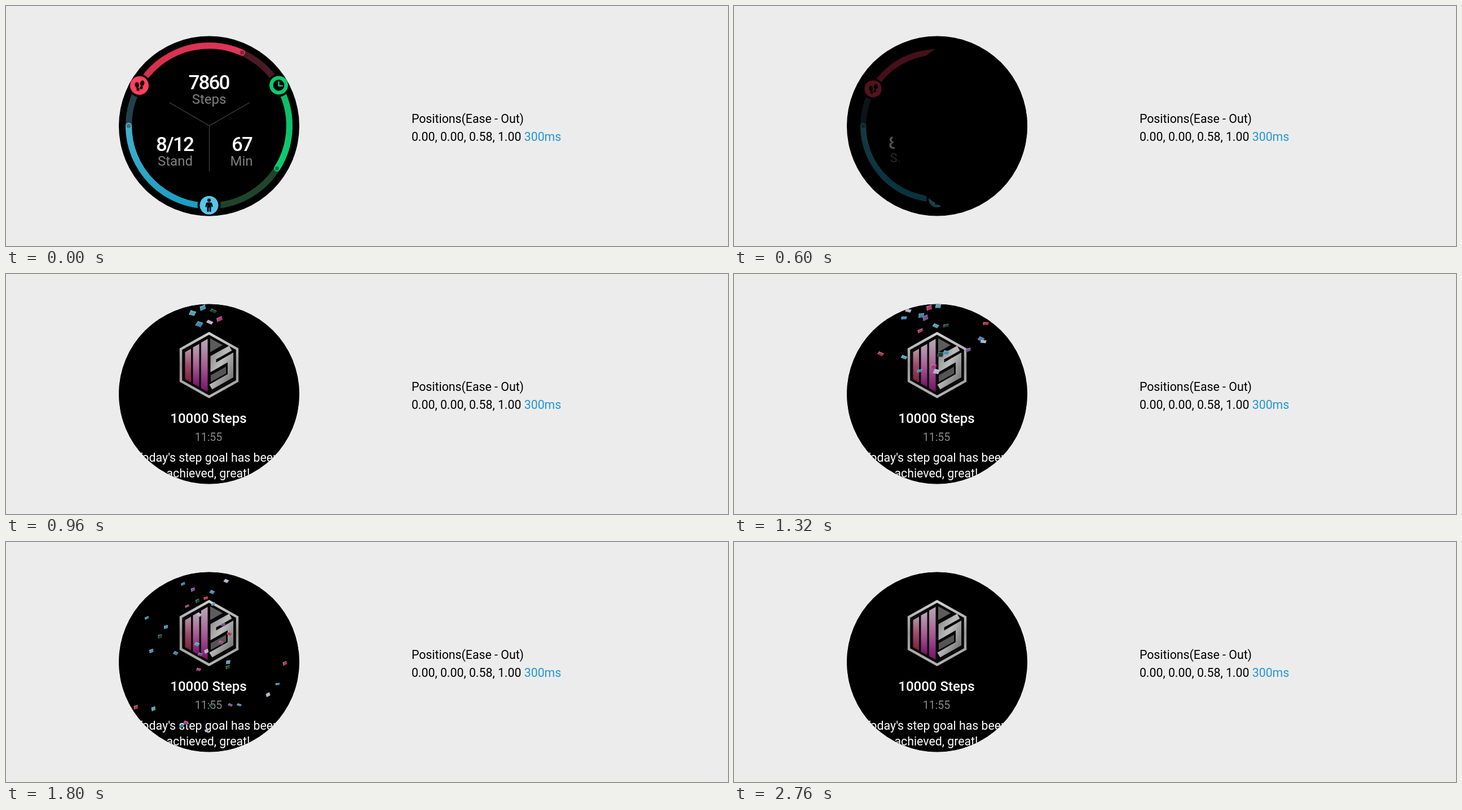
Recreate the animation shown at these times as an HTML page with a canvas. Size 1280 by 427 pixels, loop 4 s.

```html
<!DOCTYPE html>
<html lang="en">
<head>
<meta charset="utf-8">
<title>Step goal transition</title>
<style>
  html, body { margin: 0; width: 100%; height: 100%; overflow: hidden; background: #ececec; }
  svg, canvas { position: absolute; left: 0; top: 0; width: 1280px; height: 427px; }
  text { font-family: Roboto, sans-serif; }
  .mid { text-anchor: middle; fill: #fff; }
  .num { font-size: 35px; font-weight: 500; letter-spacing: -1.9px; }
  .label { font-size: 24px; fill: #808080; }
  .time { font-size: 19.5px; fill: #8a8a8a; }
  .body { font-size: 21.3px; }
  .arc { fill: none; stroke-width: 11; }

  #rings, #page, #content { animation: 4s linear infinite; }
  #rings { animation-name: recede; transform-origin: 360px 213.5px; }
  #page { animation-name: enter; }
  #content { animation-name: appear; }
  @keyframes recede {
    0%, 10.8% { transform: none; opacity: 1; animation-timing-function: cubic-bezier(0, 0, .58, 1); }
    18.3%, 100% { transform: scale(.892); opacity: .1; }
  }
  @keyframes enter {
    0%, 10.8% { transform: translateX(320px); animation-timing-function: cubic-bezier(0, 0, .58, 1); }
    18.3%, 100% { transform: none; }
  }
  @keyframes appear {
    0%, 16.5% { opacity: 0; }
    22%, 100% { opacity: 1; }
  }
</style>
</head>
<body>
<svg viewBox="0 0 1280 427">
  <defs>
    <clipPath id="face"><circle cx="360" cy="213.5" r="160"/></clipPath>
    <linearGradient id="red"><stop stop-color="#d6304c"/><stop offset="1" stop-color="#e0365a"/></linearGradient>
    <linearGradient id="green" x2="0" y2="1"><stop stop-color="#0fba68"/><stop offset="1" stop-color="#0ccb72"/></linearGradient>
    <linearGradient id="blue" x2="0" y2="1"><stop stop-color="#45b1cd"/><stop offset="1" stop-color="#1a9dc2"/></linearGradient>
    <linearGradient id="silver" x2="1" y2="1"><stop stop-color="#858585"/><stop offset=".45" stop-color="#bcbcbc"/><stop offset="1" stop-color="#6e6e6e"/></linearGradient>
    <linearGradient id="frame" x2="0" y2="1"><stop stop-color="#cfcfcf"/><stop offset=".5" stop-color="#969696"/><stop offset="1" stop-color="#b4b4b4"/></linearGradient>
    <linearGradient id="ruby" x2="0" y2="1"><stop stop-color="#b397a3"/><stop offset=".5" stop-color="#9c4a6c"/><stop offset="1" stop-color="#7d1f38"/></linearGradient>
    <linearGradient id="violet" x2="0" y2="1"><stop stop-color="#b9a8b5"/><stop offset=".5" stop-color="#a65f95"/><stop offset="1" stop-color="#761068"/></linearGradient>
  </defs>

  <circle cx="360" cy="213.5" r="160"/>
  <g clip-path="url(#face)">
    <g id="rings">
      <path class="arc" stroke="#491b24" d="M236.6 141.8A142.5 142.5 0 0 1 483.4 141.8"/>
      <path class="arc" stroke="#1f452c" d="M483.4 141.8A142.5 142.5 0 0 1 360 355.5"/>
      <path class="arc" stroke="#22414a" d="M360 355.5A142.5 142.5 0 0 1 236.6 141.8"/>
      <g stroke-linecap="round">
        <path class="arc" stroke="url(#red)" d="M236.6 141.8A142.5 142.5 0 0 1 418.5 83"/>
        <path class="arc" stroke="url(#green)" d="M483.4 141.8A142.5 142.5 0 0 1 480.5 289"/>
        <path class="arc" stroke="url(#blue)" d="M360 355.5A142.5 142.5 0 0 1 217.5 213"/>
      </g>
      <circle cx="418.5" cy="83" r="3.7" fill="#8b2237"/>
      <circle cx="480.5" cy="289" r="3.7" fill="#147343"/>
      <circle cx="217.5" cy="213.5" r="3.7" fill="#3c6f7d"/>

      <g transform="translate(236.5 141.5)">
        <circle r="20.5"/><circle r="16.5" fill="#ff405c"/>
        <g id="foot" transform="translate(-4 1) rotate(-8)">
          <ellipse cy="-2" rx="3.7" ry="5"/><ellipse cx=".6" cy="6" rx="2.7" ry="3"/>
        </g>
        <use href="#foot" transform="translate(.8 -3) scale(-1 1)"/>
      </g>
      <g transform="translate(483.5 141)">
        <circle r="20.5"/><circle r="16.5" fill="#0cca70"/><circle r="10"/>
        <path d="M0-7V1H7" fill="none" stroke="#0cca70" stroke-width="2.4"/>
      </g>
      <g transform="translate(360 354.5)">
        <circle r="20.5"/><circle r="16.5" fill="#55c6ea"/>
        <circle cy="-9" r="3"/>
        <path d="M-4-5H4Q6-4.5 6.5 3L4.7 3.5 3.5-1V11.5H.6V4H-.6V11.5H-3.5V-1L-4.7 3.5-6.5 3Q-6-4.5-4-5Z"/>
      </g>

      <path d="M290 172L360.5 213 431.5 172M360.5 213V294.5" fill="none" stroke="#434343" stroke-width="1.2"/>
      <text class="mid num" x="359.5" y="147.5">7860</text>
      <text class="mid label" x="360" y="174">Steps</text>
      <text class="mid num" x="299" y="258">8/12</text>
      <text class="mid label" x="300" y="284">Stand</text>
      <text class="mid num" x="418" y="258">67</text>
      <text class="mid label" x="417.5" y="284">Min</text>
    </g>

    <g id="page">
      <circle cx="360" cy="213.5" r="160"/>
      <g id="content">
        <path d="M360 105.5L410 133.5V190.5L360 218.5 310 190.5V133.5Z" fill="#080808" stroke="url(#frame)" stroke-width="4.4"/>
        <path d="M317.5 139L328 133V193L317.5 187Z" fill="url(#ruby)"/>
        <path d="M331.5 130.5L342.5 124.5V201L331.5 195Z" fill="url(#violet)"/>
        <path d="M346 122L357.5 115.5V209.5L346 203Z" fill="url(#violet)"/>
        <path d="M362 114.5L384 126.5 362 139Z" fill="#5c5c5c"/>
        <path d="M363 180L390 165V177L363 192Z" fill="#555"/>
        <path d="M398 132L367.5 149V166L398 148.5V181L363 201" fill="none" stroke="url(#silver)" stroke-width="10"/>
        <text class="mid" x="359" y="265" font-size="24" font-weight="500">10000 Steps</text>
        <text class="mid time" x="359" y="297">11:55</text>
        <text class="mid body" x="357.3" y="334">Today's step goal has been</text>
        <text class="mid body" x="358.5" y="362">achieved, great!</text>
      </g>
    </g>
  </g>

  <text class="body" x="718.9" y="208">Positions(Ease - Out)</text>
  <text class="body" x="718.9" y="240">0.00, 0.00, 0.58, 1.00 <tspan fill="#2196d8">300ms</tspan></text>
</svg>
<canvas id="confetti" width="1280" height="427"></canvas>

<script>
const ctx = document.getElementById('confetti').getContext('2d');
const clock = document.getElementById('page').getAnimations()[0];
const COLORS = ['#3f83a8', '#b9b2c8', '#b03672', '#5b9fb4', '#1c3f33', '#b8304c', '#4c8fb8', '#75528f'];
const COUNT = 34, START = 700, STOP = 2760;

let seed = 11;
function random(min, max) {
  seed = (seed * 16807) % 2147483647;
  return min + (max - min) * seed / 2147483647;
}

// Pieces are released one after another above the face and drift apart.
const pieces = Array.from({ length: COUNT }, (_, i) => ({
  birth: START + 28 * i + random(0, 30),
  x: 360 + random(-75, 75),
  drift: random(-0.1, 0.1),
  speed: random(0.15, 0.2),
  phase: random(0, 2 * Math.PI),
  color: COLORS[i % COLORS.length]
}));

// Pieces recede: slowly at first, then down to dots.
function sizeAt(t) {
  const k = Math.min(1, (t - START) / 1390);
  return 1.8 + 8.5 * Math.sqrt(1 - k * k);
}

function drawPiece({ birth, x, drift, speed, phase, color }, t, size) {
  const age = t - birth;
  if (age < 0) return;
  const height = size * (0.7 + 0.18 * Math.sin(t / 110 + phase));
  ctx.save();
  ctx.translate(x + drift * age, 45 + speed * age + 0.0001 * age * age);
  ctx.rotate(0.45 * Math.sin(t / 240 + phase * 2));
  ctx.transform(1, 0, -0.2, 1, 0, 0);
  ctx.fillStyle = color;
  ctx.fillRect(-size / 2, -height / 2, size, height);
  if (size > 4) {
    ctx.fillStyle = 'rgba(190, 225, 240, .4)';
    ctx.fillRect(-size / 2, -height / 2, size, 1.2);
    ctx.fillRect(-size / 2, -height / 2, 1.2, height);
  }
  ctx.restore();
}

function draw() {
  requestAnimationFrame(draw);
  const t = (clock.currentTime || 0) % 4000;
  ctx.clearRect(0, 0, 1280, 427);
  if (t < START || t >= STOP) return;
  const size = sizeAt(t);
  ctx.save();
  ctx.beginPath();
  ctx.arc(360, 213.5, 160, 0, 2 * Math.PI);
  ctx.clip();
  pieces.forEach(piece => drawPiece(piece, t, size));
  ctx.restore();
}
draw();
</script>
</body>
</html>
```
